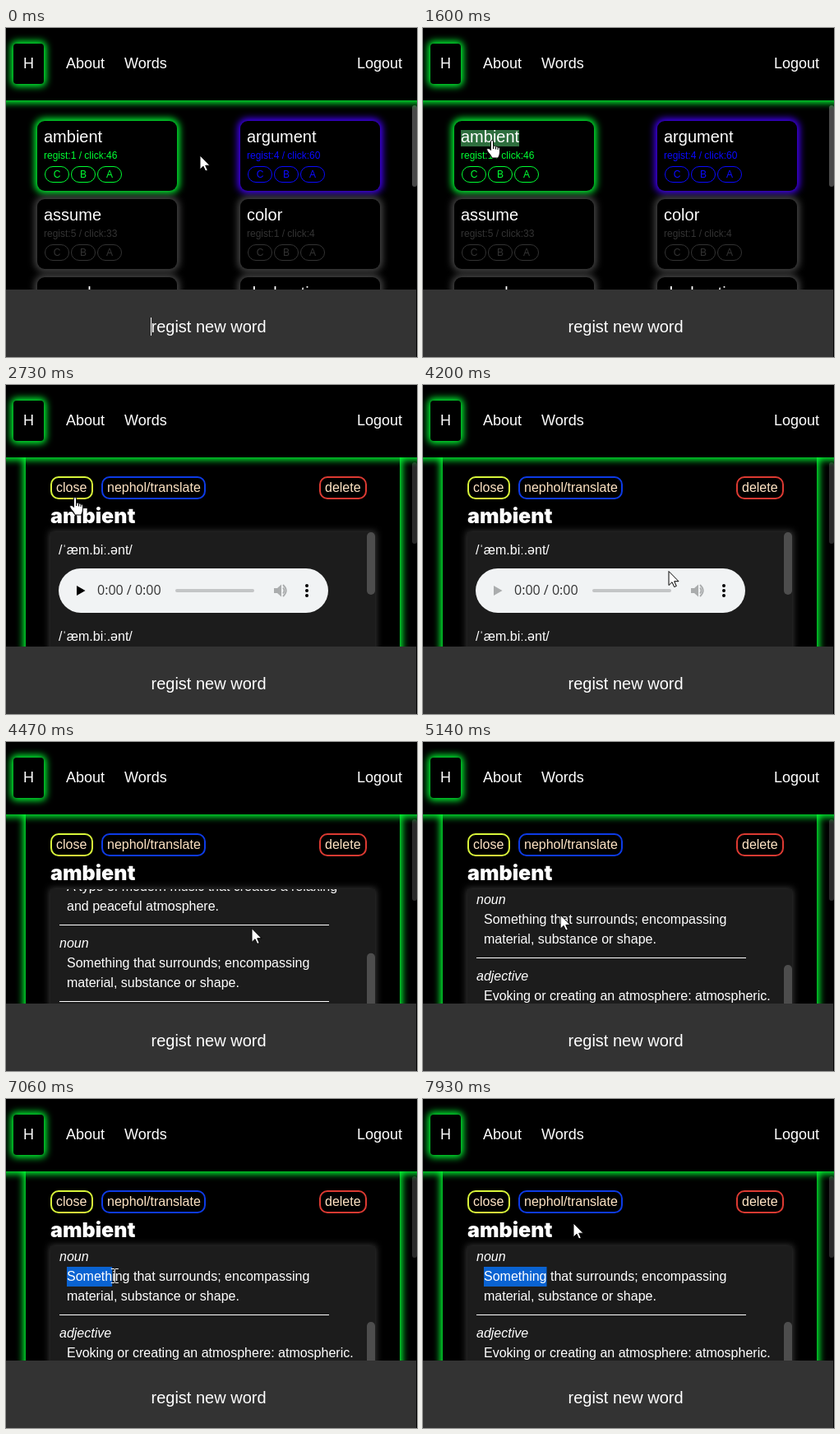
Write an HTML page that moves like this. It is 500 by 400 pixels and loops after 7990 ms.

```html
<!DOCTYPE html>
<html lang="en">
<head>
<meta charset="utf-8">
<title>Word list</title>
<style>
html, body { margin: 0; width: 100%; height: 100%; overflow: hidden; background: #000; }
svg { display: block; width: 500px; height: 400px; }
text { font-family: "Liberation Sans", Arial, sans-serif; fill: #fff; white-space: pre; }
</style>
</head>
<body>
<svg id="stage" viewBox="0 0 500 400"></svg>
<script>
const LOOP = 7990, SCROLL = 342;
const GREEN = '#00ff33', BLUE = '#0a0aff', GREY = '#333';

const rect = (x, y, w, h, fill, r = 0, more = '') =>
  `<rect x="${x}" y="${y}" width="${w}" height="${h}" rx="${r}" fill="${fill}" ${more}/>`;
const text = (x, y, size, str, more = '') =>
  `<text x="${x}" y="${y}" font-size="${size}" ${more}>${str}</text>`;
const frame = (x, y, w, h, color, r, line) =>
  rect(x + line / 2, y + line / 2, w - line, h - line, 'none', r, `stroke="${color}" stroke-width="${line}"`);

// Box with a soft halo around it
const glowBox = (x, y, w, h, fill, r, halo, spread = 3) =>
  rect(x - spread, y - spread, w + 2 * spread, h + 2 * spread, halo, r + spread, 'filter="url(#blur)"') +
  rect(x, y, w, h, fill, r);

function card(x, y, word, regist, click, ink, halo) {
  const pills = ['C', 'B', 'A'].map((c, i) =>
    frame(x + 9 + 32 * i, y + 55, 30, 20, ink, 9.5, 1) +
    text(x + 24 + 32 * i, y + 69, 12, c, `text-anchor="middle" style="fill:${ink}"`)).join('');
  return glowBox(x, y, 170, 85, '#000', 9, halo) +
    (word === 'ambient' ? rect(x + 8, y + 11, 71, 20, '#2e6e3e', 0, 'id="hover"') : '') +
    text(x + 8, y + 26, 20, word) +
    text(x + 8, y + 46, 12, `regist:${regist} / click:${click}`, `style="fill:${ink}"`) + pills;
}

const button = (x, w, label, color) =>
  frame(x, 111, w, 28, color, 9, 2) + text(x + 7, 130, 16, label, 'style="fill:#ffe4c4"');

const player = y =>
  text(64, y - 17, 16, '/ˈæm.biː.ənt/') +
  rect(64, y, 328, 54, '#f1f3f4', 27) +
  `<g transform="translate(0 ${y + 27})">
    <path class="play" d="M86 -6V6L96.500 0Z"/>
    ${text(111, 5, 16, '0:00 / 0:00', `style="font-family:'Open Sans','Noto Sans',sans-serif;fill:#333"`)}
    ${rect(206, -2, 96, 4, '#c3c5c6', 2)}
    <path d="M326 -3H330L335 -7.500V7.500L330 3H326Z" fill="#aaacad"/>
    <path d="M337 -3.500Q340 0 337 3.500M337 -7Q344.500 0 337 7" fill="none" stroke="#aaacad" stroke-width="1.800"/>
    ${[-6, 0, 6].map(dy => `<circle cx="366" cy="${dy}" r="2"/>`).join('')}
  </g>`;

const rule = y => rect(65, y, 328, 1, '#fff');
const entry = (y, kind, ...lines) =>
  text(65, y, 16, kind, 'font-style="italic"') +
  lines.map((s, i) => text(74, y + 24 * (i + 1), 16, s)).join('');

const nav = (x, label) => text(x, 49, 18, label);

document.getElementById('stage').innerHTML = `
<defs>
  <filter id="blur" filterUnits="userSpaceOnUse" x="-40" y="-40" width="580" height="520"
    color-interpolation-filters="sRGB"><feGaussianBlur stdDeviation="4.500"/></filter>
  <clipPath id="view"><rect x="54" y="179" width="395" height="139"/></clipPath>
</defs>
${rect(0, 0, 500, 400, '#000')}
<g id="cards">
  ${card(38, 113, 'ambient', 1, 46, GREEN, GREEN)}
  ${card(285, 113, 'argument', 4, 60, BLUE, '#40f')}
  ${card(38, 208, 'assume', 5, 33, GREY, '#484848')}
  ${card(285, 208, 'color', 1, 4, GREY, '#484848')}
  ${card(38, 303, 'cancel', 2, 8, GREY, '#484848')}
  ${card(285, 303, 'declaration', 1, 3, GREY, '#484848')}
</g>
<g id="panel">
  ${glowBox(24, 60, 455, 400, '#000', 0, GREEN)}
  ${button(54, 52, 'close', '#d8f53a')}
  ${button(116, 127, 'nephol/translate', '#0d3be6')}
  ${button(381, 58, 'delete', '#dc3a32')}
  ${text(54, 168, 25, 'ambient', `style="font-family:Inter,'Open Sans',sans-serif;font-weight:900"`)}
  ${glowBox(54, 179, 395, 260, '#1c1c1c', 0, '#3c3c3c', 1)}
  <g clip-path="url(#view)">
    <g id="content">
      ${player(223)}${player(328)}
      <g transform="translate(0 ${SCROLL})">
        ${rule(76)}
        ${entry(104, 'noun', 'A type of modern music that creates a relaxing', 'and peaceful atmosphere.')}
        ${rule(169)}
        ${rect(74, 204, 0, 24, '#0a63d2', 0, 'id="mark"')}
        ${entry(197, 'noun', 'Something that surrounds; encompassing', 'material, substance or shape.')}
        ${rule(262)}
        ${entry(290, 'adjective', 'Evoking or creating an atmosphere: atmospheric.')}
      </g>
    </g>
  </g>
  ${rect(439, 179, 10, 76, '#4d4d4d', 5, 'id="thumb"')}
</g>
${rect(494, 94, 6, 99, '#484848', 3, 'id="bar"')}
${glowBox(-40, -40, 580, 128, '#000', 0, GREEN)}
${glowBox(9, 19, 37, 49, '#000', 4, GREEN)}
${nav(21, 'H')}${nav(73, 'About')}${nav(144, 'Words')}${nav(427, 'Logout')}
${rect(0, 318, 499, 82, '#333')}
${text(176.5, 370, 20, 'regist new word')}
${rect(176, 352, 1, 22, '#fff', 0, 'id="caret"')}
<g id="cursor" stroke="#000" stroke-width="1" stroke-linejoin="round" fill="#fff">
  <path id="arrow" d="M0 0V17L4 13.200L6.700 19L9.300 17.900L6.700 12.200H12Z"/>
  <path id="hand" d="M5 1.500Q6.500 -.800 8 1.500V7.500Q10 6.200 11 8.200Q13 7 13.500 9Q16 8.200 16 11V15Q16 18 14 22H6.500Q5.500 19 1 14Q-.800 11.500 1 10.500Q3 10 5 12.500ZM8 7.500V11M11 8.200V11.500M13.500 9V12" />
  <path id="beam" d="M0 .500H4M5 .500H9M4.500 1V17M0 17.500H4M5 17.500H9" fill="none" stroke="#fff"/>
</g>`;

const $ = id => document.getElementById(id);
const show = (el, on) => el.setAttribute('visibility', on ? 'inherit' : 'hidden');
const ease = p => p * p * (3 - 2 * p);

// Progress of a move made in n held steps, the first at a, the last at b
function stepped(t, a, b, n) {
  if (t < a) return 0;
  if (n === 1) return 1;
  return ease(Math.min(n, Math.floor((t - a) * (n - 1) / (b - a) + 1e-6) + 1) / n);
}

// start, end, steps, x, y, shape on arrival
const moves = [
  [0, 0, 1, 236, 155, 'arrow'],
  [330, 330, 1, 237, 155, 'arrow'],
  [740, 740, 1, 239, 156, 'arrow'],
  [800, 1200, 7, 77.5, 136, 'hand'],
  [2130, 2200, 2, 72.5, 125, 'hand'],
  [2270, 2270, 1, 77.5, 136, 'hand'],
  [3110, 3390, 5, 139, 151, 'arrow'],
  [3860, 4200, 6, 299, 226.5, 'arrow'],
  [5070, 5200, 3, 121, 204.5, 'arrow'],
  [5600, 5730, 3, 117.5, 202, 'beam'],
  [6330, 6330, 1, 80.5, 229, 'arrow'],
  [6400, 6730, 5, 59.5, 201, 'beam'],
  [6930, 7000, 2, 105, 212, 'beam'],
  [7060, 7120, 2, 150.5, 200, 'beam'],
  [7450, 7450, 1, 144.5, 202, 'arrow'],
  [7590, 7930, 6, 183, 151, 'arrow']
];

function pointer(t) {
  let x = 0, y = 0, shape = 'arrow';
  for (const [a, b, n, tx, ty, kind] of moves) {
    if (t < a) break;
    const p = stepped(t, a, b, n);
    x += (tx - x) * p;
    y += (ty - y) * p;
    if (p > .85) shape = kind;
  }
  return { x, y, shape };
}

// Right edges of the letters in the marked word
const letters = [...'Something'];
const pen = document.createElement('canvas').getContext('2d');
pen.font = '16px "Liberation Sans", Arial, sans-serif';
const edges = [0, ...letters.map((_, i) => pen.measureText('Something'.slice(0, i + 1)).width)];

function draw(t) {
  const { x, y, shape } = pointer(t);
  const open = t >= 2730;
  show($('cards'), !open);
  show($('panel'), open);
  $('bar').setAttribute('fill', open ? '#2a2a2a' : '#484848');
  show($('hover'), !open && shape === 'hand');
  show($('caret'), t < 530 || t >= 1070 && t < 1600 || t >= 2130 && t < 2270);

  const s = Math.round(SCROLL * stepped(t, 4330, 4540, 4));
  $('content').setAttribute('transform', `translate(0 ${-s})`);
  $('thumb').setAttribute('y', 179 + s * .269);
  document.querySelectorAll('.play').forEach(el => el.setAttribute('fill', t < 3320 ? '#000' : '#aaacad'));

  let width = 0;
  if (t >= 7120) width = edges[letters.length];
  else if (t >= 6930) width = edges.filter(e => e <= x + 4.5 - 74).pop() || 0;
  $('mark').setAttribute('width', width);

  for (const id of ['arrow', 'hand', 'beam']) show($(id), id === shape);
  $('cursor').setAttribute('transform', `translate(${x.toFixed(1)} ${y.toFixed(1)})`);
}

function tick(now) {
  draw(now % LOOP);
  requestAnimationFrame(tick);
}
draw(0);
requestAnimationFrame(tick);
</script>
</body>
</html>
```
